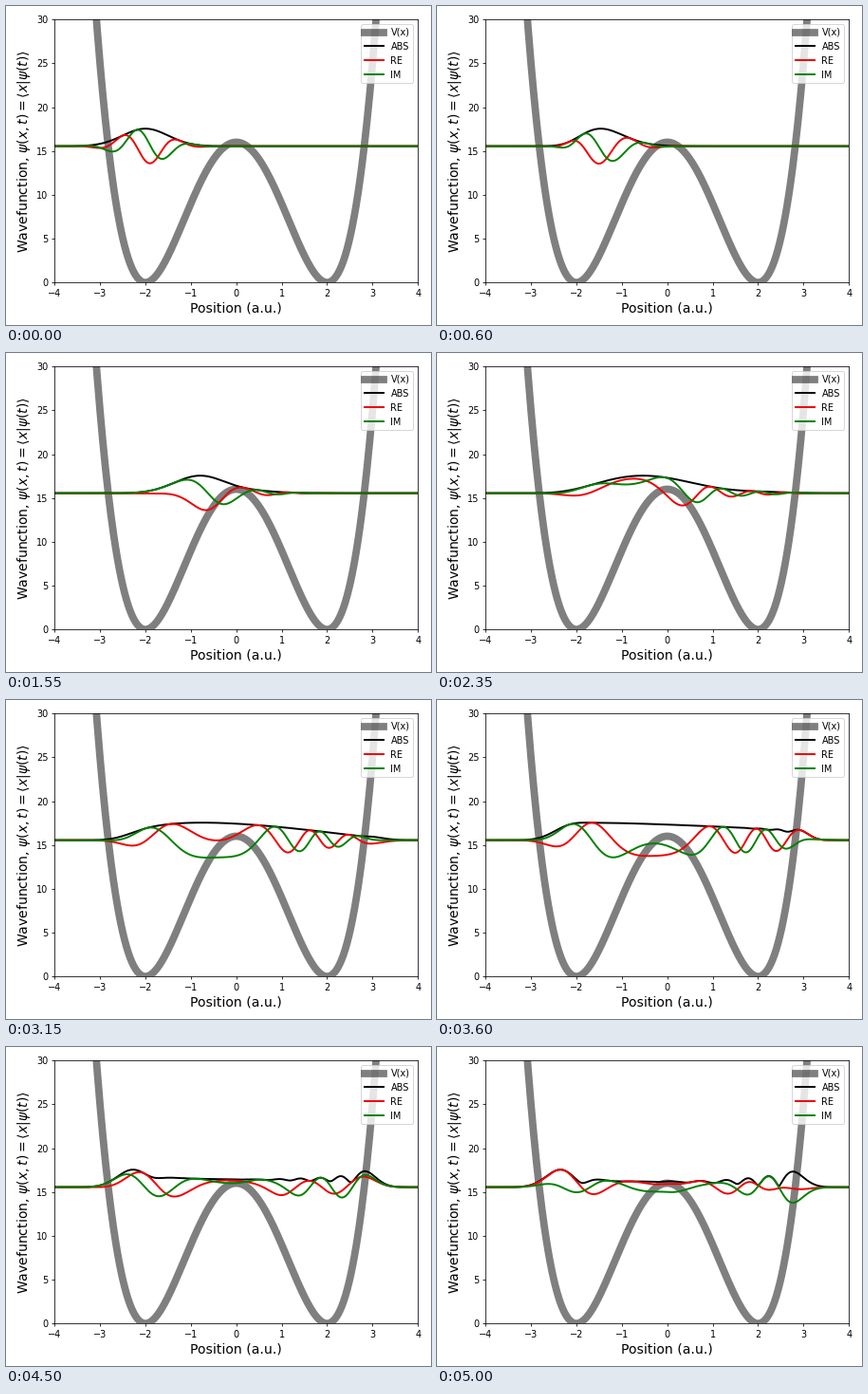
Recreate the animation shown at these times as a matplotlib script. Size 448 by 336 pixels, loop 5050 ms.

```python
import numpy as np
import matplotlib.pyplot as plt
from matplotlib.animation import FuncAnimation

W, H, DPI = 448, 336, 70
FRAMES, INTERVAL = 101, 50
DT = 0.01                 # time per frame (a.u.)
X0, K0, A = -2.0, 5.0, 2.0  # packet centre, momentum, width
HEIGHT = 2.0              # drawn height of the packet

# Sinc-basis Hamiltonian of the double well
x = np.linspace(-5, 5, 501)
dx = x[1] - x[0]
v = (x**2 - 4)**2
d = np.subtract.outer(np.arange(x.size), np.arange(x.size))
safe = np.where(d == 0, 1, d)
kinetic = np.where(d == 0, np.pi**2 / 3, 2.0 * (-1.0)**np.abs(d) / safe**2)
energies, states = np.linalg.eigh(kinetic / (2 * dx**2) + np.diag(v))

psi0 = np.exp(-A * (x - X0)**2 + 1j * K0 * x)
psi0 /= np.linalg.norm(psi0)
coef = states.T @ psi0
mean_energy = np.sum(energies * np.abs(coef)**2)


def psi(t):
    return states @ (coef * np.exp(-1j * energies * t))


fig, ax = plt.subplots(figsize=(W / DPI, H / DPI), dpi=DPI)
fig.subplots_adjust(left=51.2 / W, right=434.2 / W,
                    top=1 - 14.2 / H, bottom=1 - 291.2 / H)
ax.plot(x, v, color="k", alpha=0.5, lw=8, label="V(x)")
curves = [ax.plot(x, x, color=c, lw=2, label=name)[0]
          for c, name in (("k", "ABS"), ("#ee0000", "RE"), ("g", "IM"))]
ax.set_xlim(-4, 4)
ax.set_ylim(0, 30)
ax.set_xlabel("Position (a.u.)", fontsize="x-large")
ax.set_ylabel(r"Wavefunction, $\psi(x,t)=\langle x|\psi(t)\rangle$",
              fontsize="x-large")
ax.legend(loc="upper right")


def update(frame):
    wave = psi(frame * DT)
    wave *= HEIGHT / np.abs(wave).max()
    for curve, part in zip(curves, (np.abs(wave), wave.real, wave.imag)):
        curve.set_ydata(mean_energy + part)
    return curves


anim = FuncAnimation(fig, update, frames=FRAMES, interval=INTERVAL,
                     init_func=lambda: update(0), repeat=True, blit=False)
plt.show()
```
